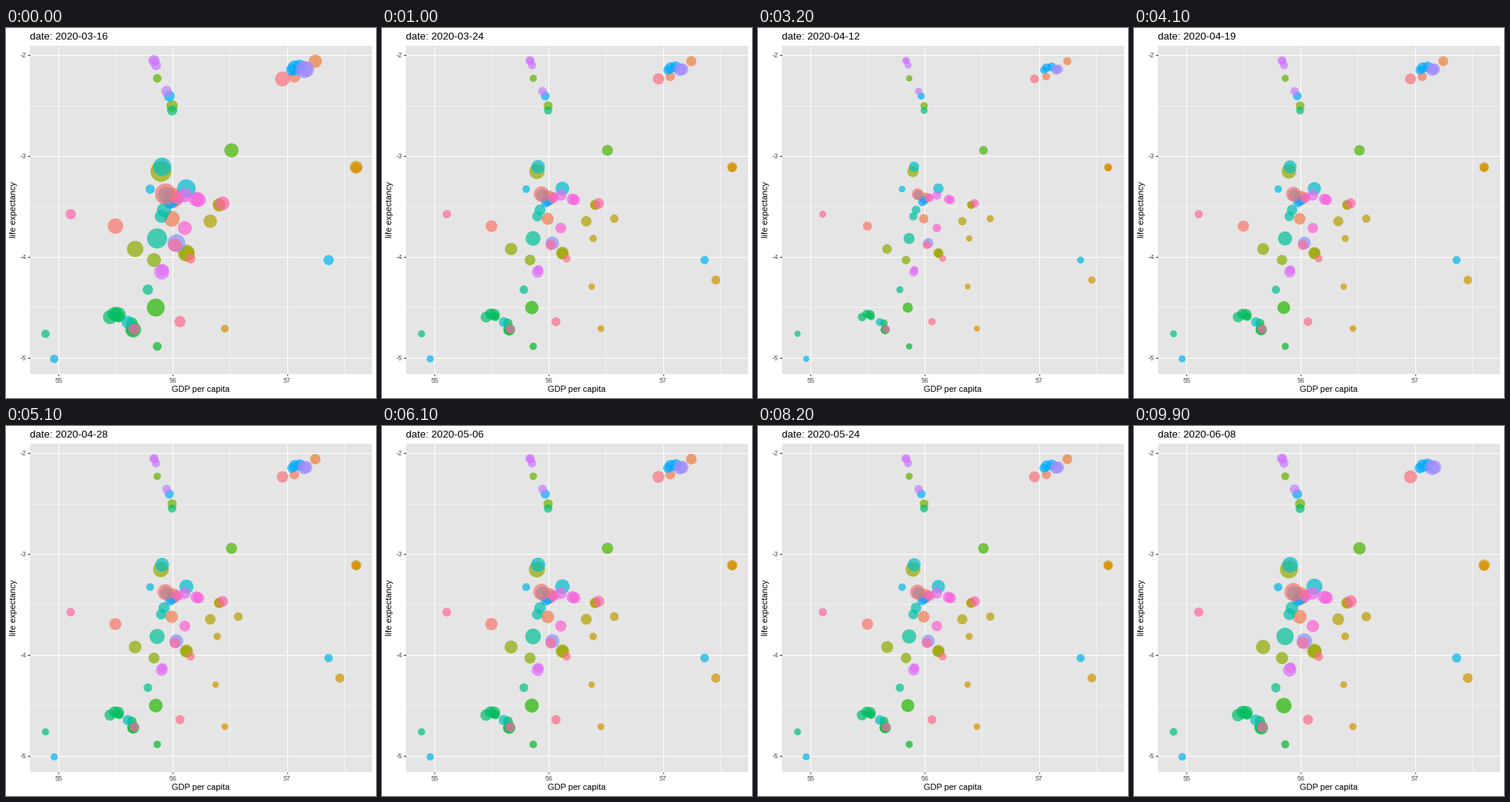
A matplotlib script for the animation above (10 s loop, 480 px wide and 480 px high).

```python
import numpy as np
import matplotlib.pyplot as plt
from matplotlib.animation import FuncAnimation
from matplotlib.patches import Rectangle

SIZE, FRAMES, INTERVAL = 480, 100, 100
LAST_DAY = 84
START = np.datetime64("2020-03-16")
LEFT, TOP, RIGHT, BOTTOM = 31, 23, 474.5, 448.5
R_MIN = 3.0

plt.rcParams["font.family"] = "Liberation Sans"


def hcl(hue, chroma=100, light=65):
    """Polar CIE-LUV to sRGB, D65 white."""
    h = np.radians(hue)
    y = ((light + 16) / 116) ** 3
    u = chroma * np.cos(h) / (13 * light) + 0.1978
    v = chroma * np.sin(h) / (13 * light) + 0.4683
    x = 9 * y * u / (4 * v)
    z = y * (12 - 3 * u - 20 * v) / (4 * v)
    lin = np.array([[3.2405, -1.5371, -0.4985],
                    [-0.9693, 1.8760, 0.0416],
                    [0.0556, -0.2040, 1.0572]]) @ [x, y, z]
    lin = np.clip(lin, 0, 1)
    return np.where(lin > 0.00304, 1.055 * lin ** (1 / 2.4) - 0.055, 12.92 * lin)


dots = []


def add(hues, *points, first=0, last=LAST_DAY):
    """Bubbles (x, y, radius) with hues spread evenly over a range."""
    for hue, (x, y, r) in zip(np.linspace(*hues, len(points)), points):
        dots.append((x, y, r, *hcl(hue), first, last))


# reds and oranges
add((15, 30), (142, 257, 10), (374, 63, 7.7), (401.3, 43, 8.5), last=83)
add((24, 28), (215, 247.5, 10.3), (216.5, 220.5, 13))
add((52, 54), (454.3, 180.5, 8.2), (454.3, 181.5, 6.8), (284, 390, 5))
add((60, 70), (433, 327, 7.2), (272, 335.5, 4.8), (274, 273, 5.6),
    (301.3, 247.3, 6.8), first=1)

# olives and yellow-greens
add((78, 100), (265, 250.7, 8.7), (276.5, 229.5, 8.6), (276.5, 229.5, 7.4),
    (234, 292, 11), (234.5, 292.5, 9.5), (201, 186, 13.5), (167.5, 286.7, 10.6),
    (192, 301, 9))
add((108, 132), (215.5, 101, 7.4), (196.2, 65.3, 5.6), (292.5, 158.7, 9.2),
    (194.3, 362.7, 11.6), (196.2, 413, 5.7))

# greens and teals
add((133, 150), (165, 391.3, 10.2), (164.5, 391.5, 8), (163.3, 383, 7.6),
    (147, 374.5, 7), (145.5, 371.8, 9.8), (141, 371, 9.3), (135, 375, 9.2))
add((155, 182), (215.5, 107, 6.5), (51.3, 396.7, 5.4), (184, 339.5, 6.8),
    (196, 273, 13), (201.5, 244.3, 8.5), (205, 236, 9.2))
add((190, 228), (158, 381.5, 8.2), (202.5, 180, 11.8), (234, 208.3, 12),
    (208, 217, 11), (187, 209, 6), (418.5, 301, 6.6), (62.5, 429.2, 5.4))

# blues and violets
add((234, 247), (211.8, 88.2, 7.1), (371, 54.5, 7.6), (374.5, 51.5, 9.3),
    (381, 50.5, 9.3), (213, 226, 8.5), (216, 223.5, 9))
add((264, 272), (221, 279, 11.5), (386.5, 54, 11), (389.5, 53.5, 10.3))
add((282, 300), (208.3, 82, 6.9), (194.7, 48.3, 6.5), (192, 42.3, 7.3),
    (192.5, 43, 6), (223, 220, 8.8), (202, 316.5, 9.8), (203, 313.7, 7.8))

# pinks
add((308, 326), (232, 217, 9.3), (247, 222, 9.6), (250, 223, 9.2),
    (232, 259.5, 9))
add((344, 372), (166, 390.5, 7.5), (281, 227.5, 9), (84, 241.5, 6.7),
    (221, 220, 8), (219, 281.5, 8.7), (225.7, 381, 7.3), (239.5, 299, 6.4),
    (358.7, 66, 9.6), (207, 215.5, 13.8))

dots = np.array(dots)
radius, first, last = dots[:, 2], dots[:, 6], dots[:, 7]

# Daily level: lockdown drop, slow recovery, weekend and holiday dips
days = np.arange(LAST_DAY + 1)
level = np.interp(days, [0, 4, 8, 14, 26, 43, 59, 84],
                  [1, 0.88, 0.66, 0.61, 0.6, 0.68, 0.74, 0.82])
level[days % 7 == 5] *= 0.9
level[days % 7 == 6] *= 0.79
for day, dip in {25: 0.85, 27: 0.84, 28: 0.82, 53: 0.88, 70: 0.82}.items():
    level[day] *= dip

fig = plt.figure(figsize=(SIZE / 72, SIZE / 72), dpi=72, facecolor="white")
ax = fig.add_axes([0, 0, 1, 1])
ax.set_xlim(0, SIZE)
ax.set_ylim(SIZE, 0)
ax.axis("off")


def px(v):
    return 68.3 + 148.1 * (v - 55)


def py(v):
    return 35.2 - 130.8 * (v + 2)


def rule(xs, ys, color, width):
    ax.plot(xs, ys, color=color, lw=width, solid_capstyle="butt", zorder=1)


ax.add_patch(Rectangle((LEFT, TOP), RIGHT - LEFT, BOTTOM - TOP,
                       fc="#E5E5E5", lw=0, zorder=0))
for v in (55.5, 56.5, 57.5):
    rule([px(v)] * 2, [TOP, BOTTOM], "white", 0.53)
for v in (-2.5, -3.5, -4.5):
    rule([LEFT, RIGHT], [py(v)] * 2, "white", 0.53)
for v in (55, 56, 57):
    rule([px(v)] * 2, [TOP, BOTTOM], "white", 1.07)
    rule([px(v)] * 2, [BOTTOM, BOTTOM + 2.75], "#333333", 1.07)
    ax.text(px(v), 460, str(v), size=8.8, color="#4D4D4D", ha="center")
for v in (-2, -3, -4, -5):
    rule([LEFT, RIGHT], [py(v)] * 2, "white", 1.07)
    rule([LEFT - 2.75, LEFT], [py(v)] * 2, "#333333", 1.07)
    ax.text(26, py(v) + 3.1, f"{v}".replace("\u2212", "-"), size=8.8,
            color="#4D4D4D", ha="right")

ax.text(252.7, 472.5, "GDP per capita", size=11, ha="center")
ax.text(13.3, 235.7, "life expectancy", size=11, ha="center", va="baseline",
        rotation=90, rotation_mode="anchor")
title = ax.text(LEFT, 15, "", size=13.2)
bubbles = ax.scatter(dots[:, 0], dots[:, 1], c=dots[:, 3:6], alpha=0.7,
                     linewidths=0, zorder=3)


def update(i):
    t = i * LAST_DAY / (FRAMES - 1)
    r = R_MIN + (radius - R_MIN) * np.interp(t, days, level)
    shown = (t >= first) & (t <= last)
    bubbles.set_sizes(np.where(shown, (2 * r) ** 2, 0))
    title.set_text(f"date: {START + int(t)}")
    return bubbles, title


anim = FuncAnimation(fig, update, frames=FRAMES, interval=INTERVAL,
                     repeat=True, repeat_delay=0)
plt.show()
```
